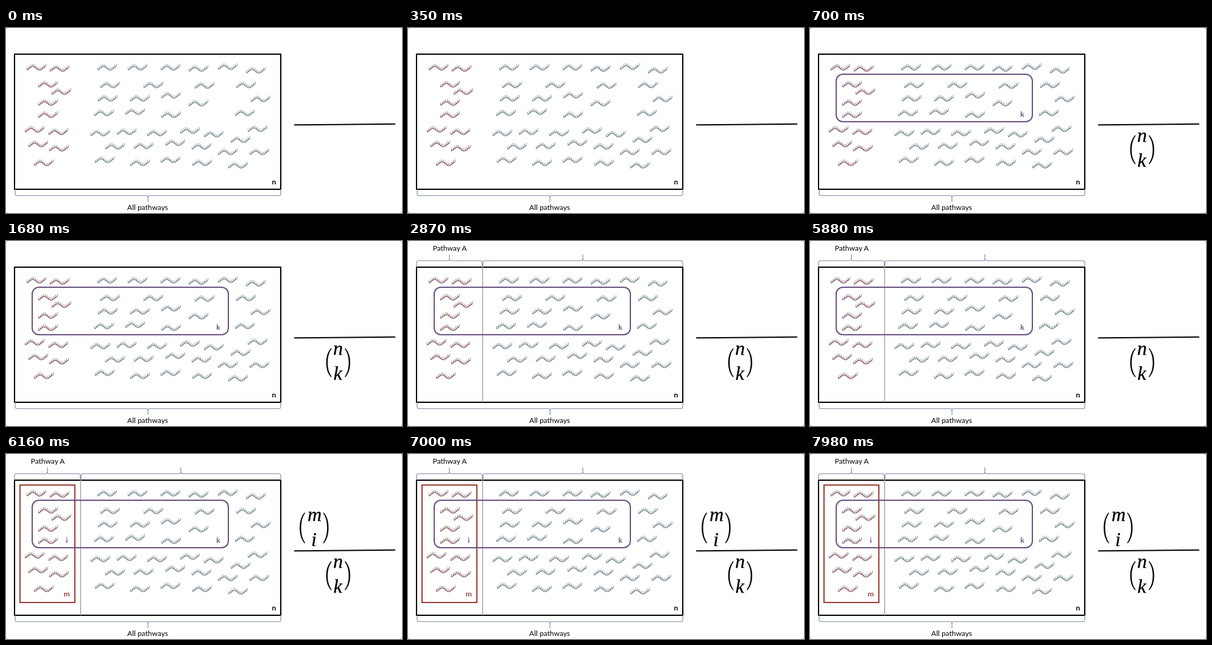
An HTML page for the animation above (8000 ms loop, 650 by 304 pixels).

```html
<!DOCTYPE html>
<html lang="en">
<head>
<meta charset="utf-8">
<title>Pathway counting</title>
<style>
  html, body { margin: 0; width: 100%; height: 100%; overflow: hidden; background: #999; }
  svg { display: block; width: 650px; height: 304px; }
  text { font: 12px Lato, Carlito, sans-serif; text-anchor: middle; }
  .bold { font-weight: 700; }
  .math text { font: italic 32px "Liberation Serif", Times, serif; stroke: #000; stroke-width: .3; }
  .brace { fill: none; stroke: #8290a5; stroke-width: 1.2; }
  .strand { fill: none; stroke-width: 1.1; }
  .ticks { fill: none; stroke-width: .8; }
</style>
</head>
<body>
<svg viewBox="0 0 650 304">
  <rect width="650" height="304" rx="3" fill="#fff"/>
  <g id="strands"></g>
  <rect x="14" y="43" width="437" height="222" fill="none" stroke="#000" stroke-width="2"/>
  <path class="brace" data-brace="15 451 265 1"/>
  <text x="232.5" y="299">All pathways</text>
  <text class="bold" x="440" y="257">n</text>
  <path d="M473 159.3L639 157.8" stroke="#000" stroke-width="2"/>

  <g data-from="2870">
    <path d="M122.5 36V265" stroke="#8e9299" stroke-width="1.2"/>
    <path class="brace" data-brace="14 122 43 -1"/>
    <path class="brace" data-brace="123 451 43 -1"/>
    <text x="68.5" y="15.5">Pathway A</text>
  </g>

  <g data-from="6160">
    <rect x="23" y="51" width="90" height="193" fill="none" stroke="#9d3c36" stroke-width="2"/>
    <text class="bold" x="99.7" y="234" fill="#9d3c36">m</text>
    <text class="bold" x="99.7" y="146" fill="#6b5180">i</text>
    <g class="math">
      <path data-parens="482 529.5 96 147"/>
      <text x="506.5" y="110">m</text>
      <text x="505.5" y="151">i</text>
    </g>
  </g>

  <g data-from="700">
    <rect x="43" y="76" width="322" height="78" rx="11" fill="none" stroke="#6b5180" stroke-width="2"/>
    <text class="bold" x="348.5" y="146" fill="#6b5180">k</text>
    <g class="math">
      <path data-parens="525.5 565 176 224"/>
      <text x="545" y="187">n</text>
      <text x="544.5" y="228">k</text>
    </g>
  </g>
</svg>
<script>
const LOOP = 8000;
const all = selector => [...document.querySelectorAll(selector)];
const numbers = s => s.split(' ').map(Number);

// Centres of the strands, as x,y pairs
const groups = [
  { strand: '#7b404c', ticks: '#705a62', at:
    '50 65 88 67 69 93 91 105 69 123 69 143 47 167 86 171 53 191 87 198 62 222' },
  { strand: '#5c737d', ticks: '#68787f', at:
    '166 65 216 65 270 65 316 67 364 64 410 70 171 94 242 94 326 95 394 94 ' +
    '167 116 220 116 271 111 316 124 418 117 161 140 212 138 271 143 392 140 ' +
    '155 173 198 171 248 173 302 169 341 175 413 166 179 195 226 194 278 189 ' +
    '321 195 385 184 364 204 416 204 162 217 220 222 270 217 322 222 381 226' }
];

const wave = x => 1.2 - 3 * Math.cos((x + 6) * Math.PI / 11);
let strand = '', ticks = '';
for (let x = -16; x <= 15; x++) strand += `${strand ? 'L' : 'M'}${x} ${wave(x).toFixed(2)}`;
for (let x = -15.5; x < 16; x += 2.8) ticks += `M${x} ${wave(x).toFixed(2)}v-4.2`;

document.getElementById('strands').innerHTML = groups.map(g => {
  const p = numbers(g.at);
  let out = '';
  for (let i = 0; i < p.length; i += 2) {
    out += `<g transform="translate(${p[i]} ${p[i + 1]})">
      <path class="ticks" stroke="${g.ticks}" d="${ticks}"/>
      <path class="strand" stroke="${g.strand}" d="${strand}"/></g>`;
  }
  return out;
}).join('');

// Curly brace lying along y, pointing down (1) or up (-1)
for (const el of all('[data-brace]')) {
  const [x0, x1, y, dir] = numbers(el.dataset.brace);
  const mid = (x0 + x1) / 2, bar = y + 10.5 * dir, tip = y + 21 * dir;
  const bend = y + 7 * dir, neck = y + 14 * dir;
  el.setAttribute('d', `M${x0} ${y}V${bend}Q${x0} ${bar} ${x0 + 3} ${bar}H${mid - 3}` +
    `Q${mid} ${bar} ${mid} ${neck}V${tip}V${neck}Q${mid} ${bar} ${mid + 3} ${bar}` +
    `H${x1 - 3}Q${x1} ${bar} ${x1} ${bend}V${y}`);
}

// Tall parentheses, thicker in the middle
for (const el of all('[data-parens]')) {
  const [left, right, top, bottom] = numbers(el.dataset.parens);
  const mid = (top + bottom) / 2;
  const side = (x, s) => {
    const end = x + 8 * s, inner = x + 2.4 * s;
    return `M${end} ${top}Q${x} ${top + 9} ${x} ${mid}T${end} ${bottom}` .replace(/T.*/,
      `Q${x} ${bottom - 9} ${end} ${bottom}`) +
      `l${s} -1Q${inner} ${bottom - 10} ${inner} ${mid}Q${inner} ${top + 10} ${end + s} ${top + 1}Z`;
  };
  el.setAttribute('d', side(left, 1) + side(right, -1));
}

const parts = all('[data-from]');
function draw(now) {
  const t = now % LOOP;
  for (const el of parts) el.style.display = t >= +el.dataset.from ? '' : 'none';
}
const start = performance.now();
function tick() {
  draw(performance.now() - start);
  requestAnimationFrame(tick);
}
tick();
</script>
</body>
</html>
```
